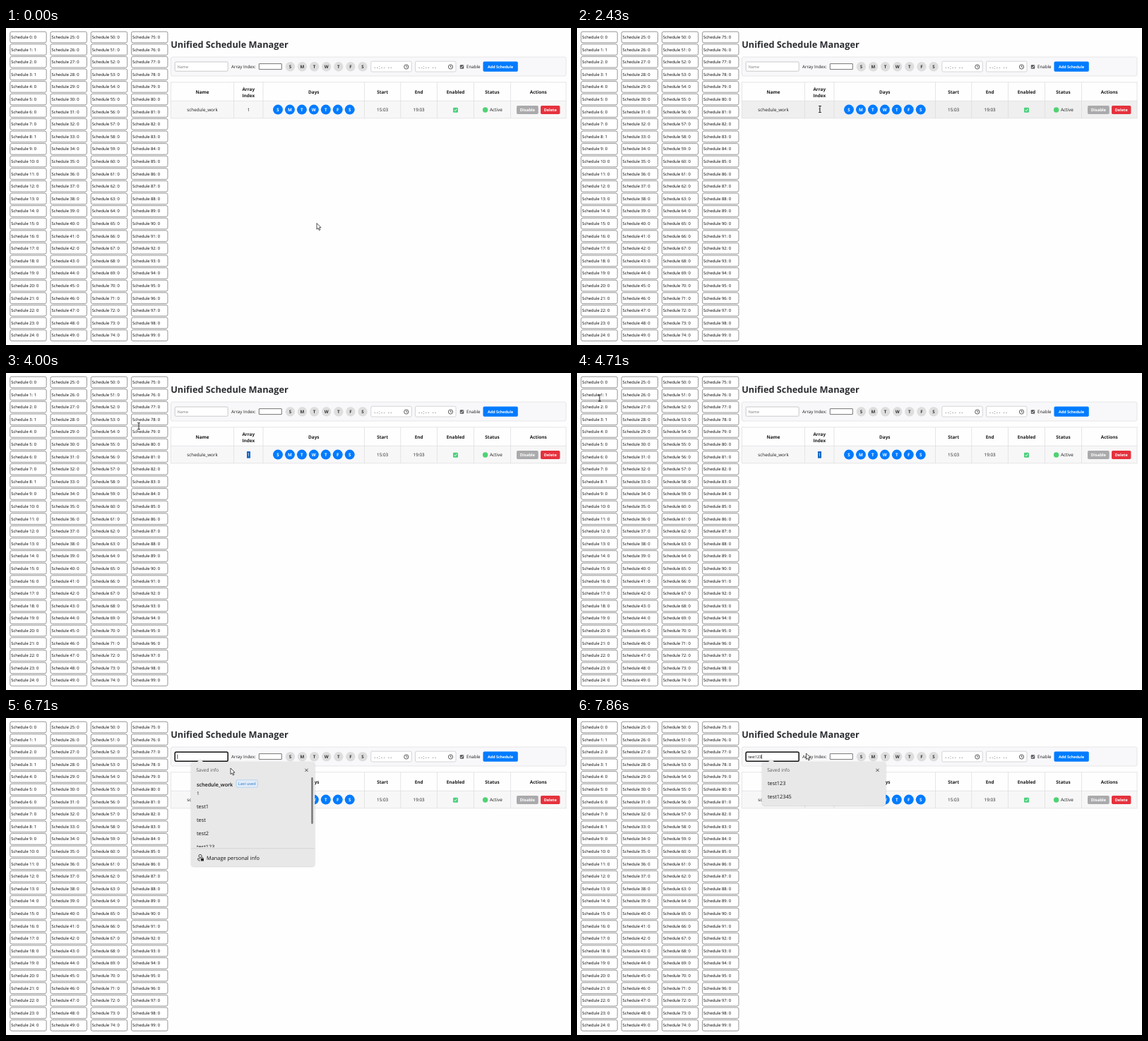
Recreate the animation shown at these times as an HTML page with a canvas. Size 800 by 449 pixels, loop 8000 ms.

```html
<!DOCTYPE html>
<html lang="en">
<head>
<meta charset="utf-8">
<title>Unified Schedule Manager</title>
<style>
  html, body { margin: 0; width: 100%; height: 100%; overflow: hidden; background: #fefefe; }
  canvas { display: block; width: 800px; height: 449px; }
</style>
</head>
<body>
<canvas id="stage"></canvas>
<script>
const WIDTH = 800, HEIGHT = 449, LOOP = 8000, STEP = 1000 / 7;
const BLUE = '#007bff', INK = '#2b2d31', DAYS = [...'SMTWTFS'];
const canvas = document.getElementById('stage');
const ctx = canvas.getContext('2d');
const ratio = window.devicePixelRatio || 1;
canvas.width = Math.round(WIDTH * ratio);
canvas.height = Math.round(HEIGHT * ratio);

// Pointer path: time, x, y
const PATH = [
  [0, 440, 276.5], [430, 440, 276.5], [1290, 335, 89], [1570, 335, 89],
  [2140, 344, 115], [3570, 344, 115], [4430, 32, 35.5], [4860, 32, 35.5],
  [5600, 268.5, 58], [6000, 268.5, 58], [6430, 318, 71], [7290, 318, 71], [7710, 324.5, 50]
];
const SELECT_AT = 3500, CLICK_AT = 5850, POPUP_AT = 5990;
const KEY_TIMES = [6700, 6850, 6990, 7280, 7420, 7560, 7700];
const TYPED = 'test123';
const SAVED = ['test1', 'test', 'test2', 'test123', 'test12345'];
// Areas with a text pointer: x, y, width, height
const TEXT_AREAS = [[5, 5, 224, 438], [239, 48, 75, 13], [333, 84, 21, 15], [340, 110, 8, 11], [257, 111, 43, 10]];

const inside = (x, y, [left, top, w, h]) => x >= left && x <= left + w && y >= top && y <= top + h;

function pointerAt(t) {
  const next = PATH.findIndex(p => p[0] > t);
  if (next < 0) return PATH[PATH.length - 1].slice(1);
  const [t0, x0, y0] = PATH[next - 1], [t1, x1, y1] = PATH[next];
  const u = (t - t0) / (t1 - t0), k = u * u * (3 - 2 * u);
  return [x0 + (x1 - x0) * k, y0 + (y1 - y0) * k];
}

// Text is placed by the middle of its capital letters.
function text(str, x, y, size, { color = '#1a1a1a', weight = 400, align = 'left', spacing = 0 } = {}) {
  ctx.font = `${weight} ${size}px "Open Sans", "Noto Sans", sans-serif`;
  ctx.textRendering = 'geometricPrecision';
  ctx.letterSpacing = `${spacing}px`;
  ctx.textAlign = align;
  ctx.fillStyle = color;
  ctx.fillText(str, x, y + size * 0.357);
}

function box(x, y, w, h, radius, fill, stroke, line = 0.7) {
  ctx.beginPath();
  ctx.roundRect(x, y, w, h, radius);
  if (fill) { ctx.fillStyle = fill; ctx.fill(); }
  if (stroke) { ctx.strokeStyle = stroke; ctx.lineWidth = line; ctx.stroke(); }
}

function disc(x, y, r, fill) {
  ctx.beginPath();
  ctx.arc(x, y, r, 0, Math.PI * 2);
  ctx.fillStyle = fill;
  ctx.fill();
}

function polyline(points, stroke, line = 0.8) {
  ctx.beginPath();
  points.forEach(([x, y]) => ctx.lineTo(x, y));
  ctx.strokeStyle = stroke;
  ctx.lineWidth = line;
  ctx.stroke();
}

function button(label, x, y, w, h, fill, size) {
  box(x, y, w, h, 1.8, fill);
  text(label, x + w / 2, y + h / 2, size, { color: '#fff', weight: 700, align: 'center' });
}

function dayDiscs(x, y, gap, r, fill, color) {
  DAYS.forEach((day, i) => {
    disc(x + i * gap, y, r, fill);
    text(day, x + i * gap, y, 6.2, { color, weight: 700, align: 'center' });
  });
}

function checkMark(x, y, color) {
  polyline([[x - 1.8, y], [x - 0.5, y + 1.4], [x + 1.9, y - 1.6]], color, 1);
}

function drawScheduleList() {
  for (let i = 0; i < 100; i++) {
    const x = 5.8 + Math.floor(i / 25) * 57.25, y = 5.2 + (i % 25) * 17.6;
    box(x, y, 51.4, 15.6, 2.2, '#fff', '#7c7c7c', 0.8);
    const value = [1, 3, 8].includes(i) ? 1 : 0;
    text(`Schedule ${i}: ${value}`, x + 1.4, y + 7.7, 5.8, { color: '#000', weight: 500 });
  }
}

function timeInput(x) {
  box(x, 47.2, 57.5, 14.8, 1.8, '#fff', '#c4c4c8');
  text('--:-- --', x + 4.5, 55.2, 6.8, { color: '#444', spacing: 1.2 });
  ctx.beginPath();
  ctx.arc(x + 50, 55, 3.1, 0, Math.PI * 2);
  ctx.strokeStyle = '#333';
  ctx.lineWidth = 0.8;
  ctx.stroke();
  polyline([[x + 50, 53], [x + 50, 55.2], [x + 51.6, 55.2]], '#333', 0.7);
}

function drawForm(focused, typed) {
  text('Unified Schedule Manager', 233.2, 23.5, 12.75, { color: INK, weight: 700 });
  box(233.5, 41, 559.5, 27, 2.5, '#f8f8fa', '#dddde0');
  if (focused) {
    box(239.2, 48.2, 75, 13, 1.5, '#fff', '#111', 1.5);
    text(typed, 242.5, 54.8, 5.4, { color: '#000', weight: 500 });
    const caret = 242.8 + ctx.measureText(typed).width;
    polyline([[caret, 51.8], [caret, 58]], '#111', 0.7);
  } else {
    box(239.2, 48, 75, 13.2, 1.5, '#fff', '#b5b5b8');
    text('Name', 242.8, 54.7, 5.4, { color: '#777' });
  }
  text('Array Index:', 319, 55, 6.2);
  box(358.3, 50.6, 32, 8, 0.3, '#fff', '#555', 0.8);
  dayDiscs(402.4, 54.8, 17.1, 6.7, '#dedede', '#333');
  timeInput(516.8);
  timeInput(579.5);
  box(642.8, 52.2, 5.4, 5.6, 1, '#55575b');
  checkMark(645.5, 55, '#fff');
  text('Enable', 652, 55, 6.2);
  button('Add Schedule', 675.5, 47.6, 49.3, 14.2, BLUE, 5.4);
}

function drawTable(hovered, selected) {
  const centered = { align: 'center' }, heading = { align: 'center', weight: 700 };
  const edges = [233.5, 322.5, 364, 507.5, 558.7, 610.5, 662.5, 714.5, 793];
  const middles = edges.slice(1).map((edge, i) => (edge + edges[i]) / 2);
  box(233.5, 77, 559.5, 26, 0, '#fefefe');
  box(233.5, 103.3, 559.5, 24.5, 0, hovered ? '#efefef' : '#f8f7f8');
  edges.forEach(x => polyline([[x, 76.8], [x, 127.8]], '#dcdcde', 0.7));
  [76.8, 103.3, 127.8].forEach(y => polyline([[233.2, y], [793.3, y]], '#dcdcde', 0.7));

  const titles = ['Name', '', 'Days', 'Start', 'End', 'Enabled', 'Status', 'Actions'];
  titles.forEach((title, i) => text(title, middles[i], 91, 6.4, heading));
  text('Array', middles[1], 86.6, 6.4, heading);
  text('Index', middles[1], 95.6, 6.4, heading);

  text('schedule_work', middles[0], 116, 6.25, centered);
  if (selected) box(341, 111, 5, 9.6, 0, '#1268c4');
  text('1', 343.5, 116, 6.25, { align: 'center', color: selected ? '#fff' : '#222' });
  dayDiscs(385, 115.6, 16.95, 7, BLUE, '#fff');
  text('15:03', middles[3], 116, 6.25, centered);
  text('19:03', middles[4], 116, 6.25, centered);
  box(633, 112.7, 7, 7, 1.2, '#4ad07c');
  checkMark(636.5, 116.2, '#fff');
  disc(678.6, 116, 3.7, '#4fd273');
  text('Active', 685, 116, 6.4);
  button('Disable', 723, 110, 30.7, 12, '#aaaaac', 5.8);
  button('Delete', 757, 110, 27.4, 12, '#e5323d', 5.5);
}

function drawPopup(query) {
  const full = query === '';
  const matches = SAVED.filter(item => item.startsWith(query));
  const bottom = full ? 210.3 : 86 + 19 * matches.length;
  ctx.save();
  ctx.shadowColor = 'rgba(0,0,0,.2)';
  ctx.shadowBlur = 2 * ratio;
  ctx.shadowOffsetY = 0.5 * ratio;
  box(262, 62, 175.2, bottom - 62, 4, '#e8e8e8');
  ctx.restore();
  ctx.beginPath();
  ctx.moveTo(270.5, 62.5);
  ctx.lineTo(275, 58);
  ctx.lineTo(279.5, 62.5);
  ctx.fillStyle = '#e8e8e8';
  ctx.fill();

  text('Saved info', 269.2, 74, 6.6, { color: '#5c5c5c' });
  polyline([[423.4, 71.8], [427.6, 76]], '#222');
  polyline([[427.6, 71.8], [423.4, 76]], '#222');

  ctx.save();
  ctx.beginPath();
  ctx.rect(262, 80, 175, full ? 103 : bottom - 80);
  ctx.clip();
  matches.forEach((item, i) => text(item, 270, (full ? 125.3 : 92) + i * 18.9, 7.35, { color: '#111' }));
  ctx.restore();
  if (!full) return;

  text('schedule_work', 270, 94, 7.15, { color: '#111', weight: 600 });
  box(326, 87.8, 30.4, 10.4, 2, '#e3edf8', '#a3c8ec', 0.7);
  text('Last used', 341.2, 93, 5.6, { color: '#1a73c8', align: 'center' });
  text('1', 270, 107, 6.5);
  box(432.2, 84, 2.6, 66, 1.3, '#7b7b7b');
  polyline([[262, 184.8], [437.2, 184.8]], '#d0d0d0', 0.8);

  ctx.beginPath();
  ctx.arc(275, 195.5, 2.1, 0, Math.PI * 2);
  ctx.strokeStyle = '#222';
  ctx.lineWidth = 0.8;
  ctx.stroke();
  polyline([[275, 202.3], [272.2, 201.6], [271.4, 199.2], [275.5, 199.2]], '#222');
  box(276, 199, 4, 3.6, 0.6, '#222');
  box(276.9, 197.4, 2.2, 2.6, 1, null, '#222', 0.7);
  text('Manage personal info', 284, 198.3, 7.4, { color: '#111' });
}

function drawPointer(x, y, overText) {
  if (overText) {
    polyline([[x - 2, y - 4.5], [x + 2, y - 4.5]], '#222', 0.9);
    polyline([[x, y - 4.5], [x, y + 4.5]], '#222', 0.9);
    polyline([[x - 2, y + 4.5], [x + 2, y + 4.5]], '#222', 0.9);
    return;
  }
  ctx.save();
  ctx.translate(x, y);
  ctx.beginPath();
  [[0, 0], [0, 8.6], [2, 6.9], [3.4, 10], [4.9, 9.3], [3.5, 6.3], [6, 6.1]].forEach(p => ctx.lineTo(...p));
  ctx.closePath();
  ctx.fillStyle = '#fff';
  ctx.fill();
  ctx.strokeStyle = '#222';
  ctx.lineWidth = 0.8;
  ctx.stroke();
  ctx.restore();
}

const typedAt = t => TYPED.slice(0, KEY_TIMES.filter(key => key <= t).length);

function draw(now) {
  const t = Math.floor((now % LOOP + 4) / STEP) * STEP;
  const [x, y] = pointerAt(t);
  const focused = t >= CLICK_AT;
  ctx.setTransform(ratio, 0, 0, ratio, 0, 0);
  ctx.fillStyle = '#fefefe';
  ctx.fillRect(0, 0, WIDTH, HEIGHT);
  drawScheduleList();
  drawForm(focused, typedAt(t));
  drawTable(inside(x, y, [233, 103, 560, 25]), t >= SELECT_AT && !focused);
  // Suggestions follow the typing one step late.
  if (t >= POPUP_AT) drawPopup(typedAt(t - STEP));
  drawPointer(x, y, TEXT_AREAS.some(area => inside(x, y, area)));
}

let start;
function animate(now) {
  start ??= now;
  draw(now - start);
  requestAnimationFrame(animate);
}
requestAnimationFrame(animate);
</script>
</body>
</html>
```
